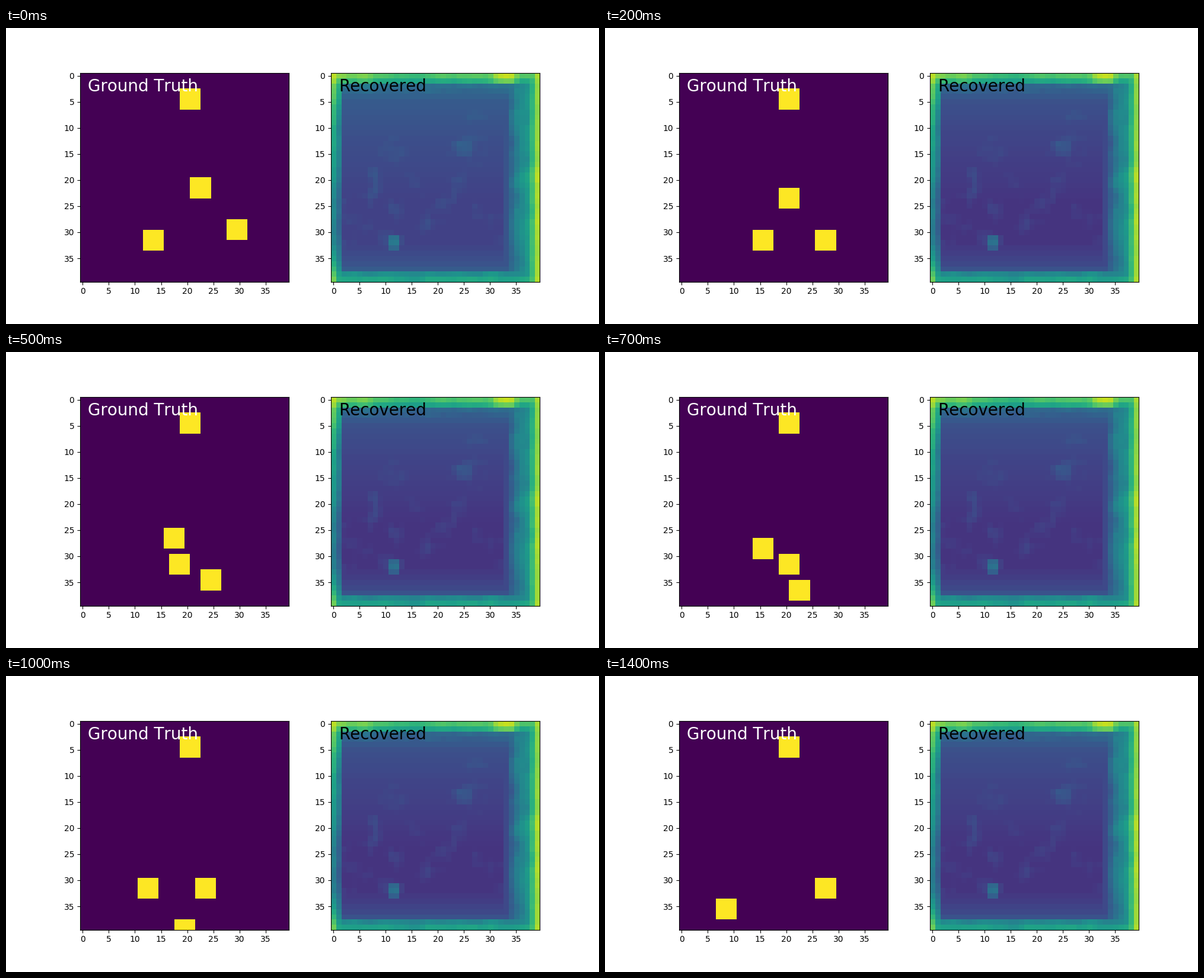
These frames come from a looping animation (1000x500 px, 1.5 s). A matplotlib script:

```python
import numpy as np
import matplotlib.pyplot as plt
from matplotlib.animation import FuncAnimation

N, FRAMES, INTERVAL = 40, 15, 100
rows, cols = np.mgrid[:N, :N]

# Row, column of the top-left corner and their velocity in cells per frame.
BLOCKS = [((3, 19), (0, 0)), ((20, 21), (1, -1)),
          ((30, 12), (0, 1)), ((28, 28), (1, -1))]


def soft_patch(row, col, half_height, half_width):
    """Box with soft edges, 1 in its middle."""
    return np.exp(-((rows - row) / half_height) ** 4
                  - ((cols - col) / half_width) ** 4)


def streaks(rng, scale):
    """Random grain, blurred a little along both axes."""
    grain = rng.normal(0, 1, (N, N))
    for axis in (0, 1):
        grain = grain + np.roll(grain, 1, axis) + .5 * np.roll(grain, 2, axis)
    return scale * grain / grain.std()


def make_map():
    rng = np.random.default_rng(4)
    field = .18 - .0012 * rows + streaks(rng, .018)

    # Dark and light areas of the interior.
    for *place, change in [
        (10.5, 4.5, 6, 2.6, -.06), (7.5, 13, 2, 4, -.05),
        (18, 18.5, 2, 2.5, -.08), (21, 4, 1.3, 3, -.09),
        (21.7, 11.5, .9, 1.2, -.10), (27.5, 9.5, 2.2, 1.3, -.07),
        (31, 22.5, 1.8, 4.5, -.09), (23, 31, 2.2, 1.8, -.09),
        (12.5, 31.5, 3, 1.2, -.08), (32, 11.5, 1.4, 1.2, .22),
        (9, 27.5, 4, 3, .06), (13.8, 24, 1.6, 2.6, .09),
        (13, 11.5, 3.5, 3, .06), (20.5, 7.8, 3.5, 1.2, .08),
    ]:
        field += change * soft_patch(*place)

    # Bright frame: a level for each distance from an edge.
    left = np.interp(rows, [0, 11, 24, 32, 39], [.80, .59, .43, .43, .76])
    from_right = N - 1 - cols
    from_bottom = N - 1 - rows
    edges = [
        left * np.interp(cols, [0, 1, 2], [1, .75, .35]),
        np.interp(rows, [0, 1, 2, 6, 7], [.70, .59, .33, .22, 0]),
        np.interp(from_right, [0, 1, 2, 4, 6, 7], [.85, .66, .50, .40, .22, 0]),
        np.interp(from_bottom, [0, 1, 2, 3], [.57, .47, .25, 0]),
    ]
    grain = streaks(rng, .02)
    for edge in edges:
        field = np.maximum(field, edge + grain * (edge > .3))

    field += .23 * soft_patch(0, 32.7, 1.6, 2.3)
    field += .11 * soft_patch(0, 3, 1.6, 4)
    return np.clip(field, .01, 1)


def truth(n):
    grid = np.zeros((N, N))
    for (row, col), (dr, dc) in BLOCKS:
        r, c = row + dr * n, col + dc * n
        grid[r:r + 4, c:c + 4] = 1
    return grid


settled = make_map()


def recovered(n):
    return settled + .05 * (1 - settled) * .2 ** n


plt.rcParams["text.kerning_factor"] = 6
fig, axes = plt.subplots(1, 2, figsize=(10, 5), dpi=100)
images = []
for ax, label, color, data in zip(axes, ("Ground Truth", "Recovered"),
                                  ("white", "black"), (truth, recovered)):
    images.append(ax.imshow(data(0), cmap="viridis", vmin=0, vmax=1,
                            interpolation="nearest"))
    ax.set_xticks(range(0, N, 5))
    ax.set_yticks(range(0, N, 5))
    ax.text(1, 3, label, color=color, fontsize=20)


def update(n):
    images[0].set_data(truth(n))
    images[1].set_data(recovered(n))
    return images


anim = FuncAnimation(fig, update, frames=FRAMES, interval=INTERVAL, repeat=True)
plt.show()
```
